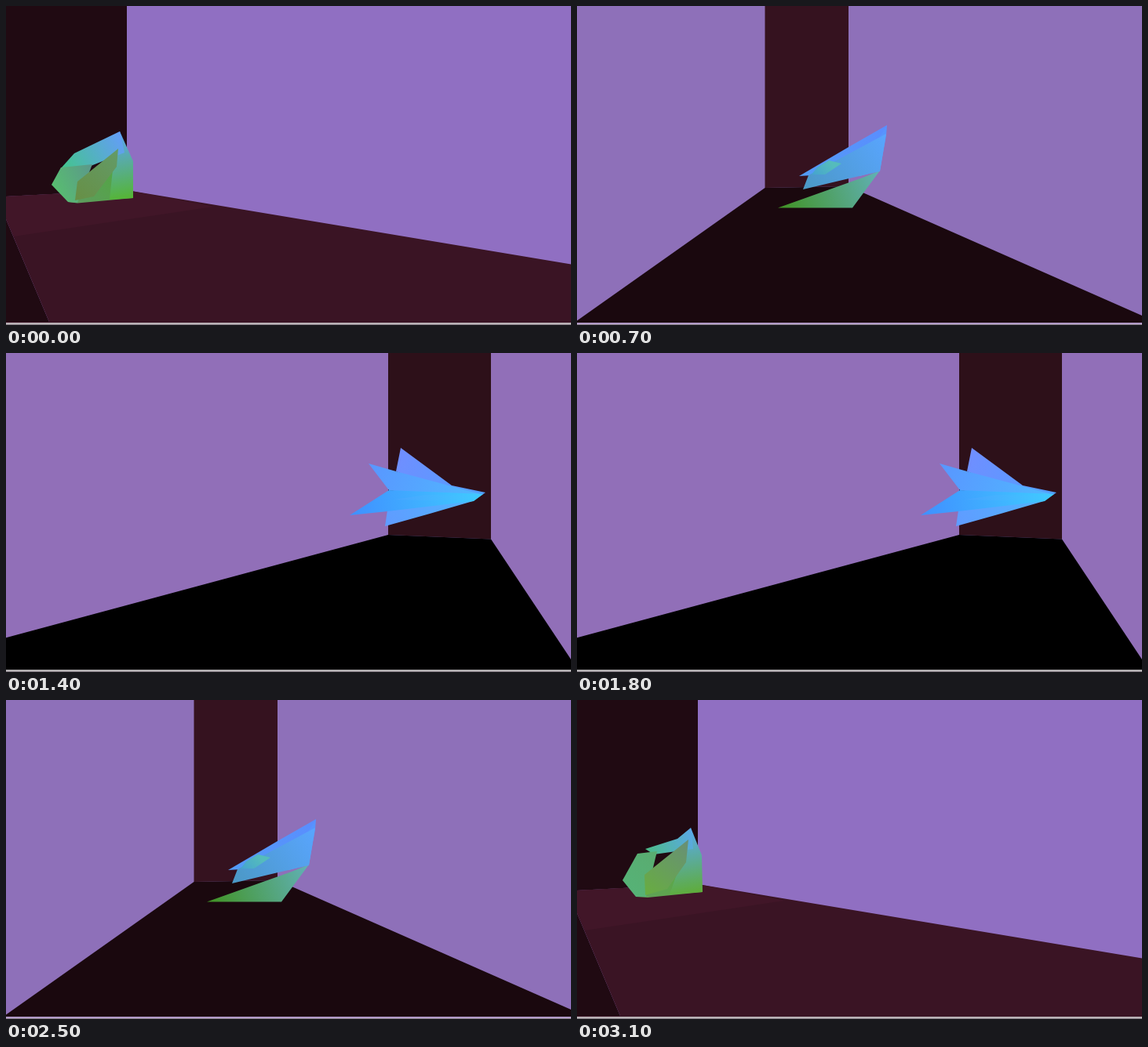
An HTML page with a canvas that plays this animation: 720x407 px, repeating every 3200 ms.

```html
<!DOCTYPE html>
<html lang="en">
<head>
<meta charset="utf-8">
<title>Crystal room</title>
<style>
  html, body { margin: 0; width: 100%; height: 100%; overflow: hidden; background: #000; }
  canvas { display: block; width: 100vw; height: 100vh; }
</style>
</head>
<body>
<canvas id="stage" width="720" height="407"></canvas>
<script>
const ctx = document.getElementById('stage').getContext('2d');
const STEP = 100, LOOP = 3200;

// Room as seen from three points of the camera's orbit.
// Corners are where the far wall meets the floor; ends are the floor edges at y = 403.
const roomLeft = {
  leftCorner: [-12, 243.5], rightCorner: [154, 235], leftEnd: 55, rightEnd: 1160,
  wall: '#906fc2', far: '#200a12', floor: '#3a1424', strip: '#bab3b7', glow: 1
};
const roomCentre = {
  leftCorner: [239.5, 232], rightCorner: [346, 230], leftEnd: -2, rightEnd: 738,
  wall: '#8e70b9', far: '#35121f', floor: '#1a080e', strip: '#b29bc9', glow: 0
};
const roomRight = {
  leftCorner: [487, 232], rightCorner: [618, 237.5], leftEnd: -148, rightEnd: 728,
  wall: '#916fb8', far: '#2d1019', floor: '#000000', strip: '#b5b2b4', glow: 0
};

// Crystal facets in painting order: lower, side, upper, middle, inner.
// Each has two colours, blended from its first corner to its third.
const facet = (from, to, ...corners) => ({ from, to, corners });

const blobWide = [
  facet('#5f9a62', '#50a83c', 79, 250, 91, 222, 150, 195, 162, 245, 91, 251.5),
  facet('#5ba4fa', '#55b532', 145, 160, 162, 198, 162, 245, 132, 247, 138, 190),
  facet('#43c58b', '#649df8', 70, 207, 87, 188, 145, 160, 151, 187, 108, 204),
  facet('#58bd70', '#5b978b', 58, 228, 70, 206, 110, 202, 91, 251, 79, 250),
  facet('#678f45', '#639b68', 88, 248, 91, 224, 143, 182, 141, 205, 112, 243)
];
const blobTall = [
  facet('#60a05a', '#5aab3b', 75, 251, 90, 225, 150, 195, 160, 245, 90, 252),
  facet('#58aaf4', '#5fac38', 145, 163, 159, 198, 160, 245, 118, 248, 140, 185),
  facet('#4cbb87', '#5ba8e8', 87, 190, 128, 177, 145, 163, 148, 190, 98, 197),
  facet('#56b276', '#5aab70', 58, 230, 77, 196, 102, 193, 88, 251, 75, 251),
  facet('#68ad40', '#688f78', 87, 249, 86, 223, 142, 178, 139, 207, 115, 241)
];
const wingsCentre = [
  facet('#419322', '#61b1b7', 256, 257.5, 364, 219, 386, 210, 351, 257.5, 303, 257.5),
  facet('#5791ff', '#5ba5f8', 395, 152, 394, 165, 386, 210, 360, 217, 365, 180),
  facet('#529cf5', '#5a8dff', 283, 217, 346, 180, 395, 152, 372, 190, 316, 215),
  facet('#4b98c4', '#59a5ff', 288, 234, 295, 216, 394, 163, 386, 211, 351, 219),
  facet('#45a3cf', '#55bcbc', 299, 215, 306, 206, 321, 197, 337, 201, 316, 215)
];
const wingsFlat = [
  facet('#4da6cb', '#50b7f4', 453, 220.5, 530, 210, 590, 202, 538, 233, 515, 230),
  facet('#65aaff', '#4fc3ff', 614, 168, 602, 185, 590, 201, 565, 206, 560, 190),
  facet('#57a0ff', '#68adff', 477, 194, 550, 180, 614, 168, 590, 202, 496, 195.5),
  facet('#4998f5', '#52baff', 470, 201, 496, 197, 602, 185, 590, 202, 541, 208),
  facet('#57a9ff', '#5bb4ff', 515, 197, 550, 190, 600, 184, 585, 198, 550, 200)
];
const birdOpen = [
  facet('#609bff', '#50b5ff', 483, 221, 486, 201, 598, 184, 595, 189, 540, 205),
  facet('#708eff', '#519fff', 503, 121, 568, 169, 611, 178, 595, 189, 497, 151),
  facet('#5996ff', '#50b8ff', 462, 141, 497, 151, 605, 180, 580, 188, 488, 175),
  facet('#408fff', '#3fccff', 438, 207, 488, 175, 608, 180, 596, 189, 486, 202),
  facet('#48a4ff', '#40c8ff', 495, 187, 535, 181, 600, 182, 588, 187, 540, 188)
];

const roomKeys = [[0, roomLeft], [250, roomLeft], [700, roomCentre], [1000, roomRight], [1600, roomRight]];
const crystalKeys = [[0, blobWide], [100, blobTall], [250, blobTall], [700, wingsCentre],
                     [1000, wingsFlat], [1400, birdOpen], [1600, birdOpen]];

function mixColour(a, b, k) {
  const channel = (c, i) => parseInt(c.slice(i, i + 2), 16);
  return `rgb(${[1, 3, 5].map(i => Math.round(mix(channel(a, i), channel(b, i), k)))})`;
}

// Blends numbers, colours, and lists or objects of them.
function mix(a, b, k) {
  if (typeof a === 'number') return a + (b - a) * k;
  if (typeof a === 'string') return mixColour(a, b, k);
  if (Array.isArray(a)) return a.map((v, i) => mix(v, b[i], k));
  return Object.fromEntries(Object.keys(a).map(key => [key, mix(a[key], b[key], k)]));
}

function sample(keys, time) {
  const next = Math.max(1, keys.findIndex(key => key[0] >= time));
  const [start, a] = keys[next - 1], [end, b] = keys[next];
  return mix(a, b, (time - start) / (end - start));
}

function polygon(fill, points) {
  ctx.fillStyle = fill;
  ctx.beginPath();
  for (let i = 0; i < points.length; i += 2) ctx.lineTo(points[i], points[i + 1]);
  ctx.closePath();
  ctx.fill();
}

function drawRoom(room) {
  const [lx, ly] = room.leftCorner, [rx, ry] = room.rightCorner;
  ctx.fillStyle = room.wall;
  ctx.fillRect(0, 0, 720, 407);
  polygon(room.far, [lx, 0, rx, 0, rx, ry, lx, ly]);
  // Past the left wall only its dark back is seen.
  if (lx < room.leftEnd) polygon(room.far, [-400, 0, lx, 0, lx, ly, room.leftEnd, 403, -400, 403]);
  polygon(room.floor, [lx, ly, rx, ry, room.rightEnd, 403, room.leftEnd, 403]);
  if (room.glow > 0) {
    ctx.globalAlpha = room.glow;
    polygon('#411628', [lx, ly, rx, ry, rx + 110, ry + 21, lx + 22, ly + 50.5]);
    ctx.globalAlpha = 1;
  }
  ctx.fillStyle = room.floor;
  ctx.fillRect(0, 403, 720, 4);
  ctx.fillStyle = room.strip;
  ctx.fillRect(0, 404, 720, 2);
  ctx.fillStyle = '#8d858d';
  ctx.fillRect(0, 406, 720, 1);
}

function drawFacet({ from, to, corners }) {
  const shade = ctx.createLinearGradient(corners[0], corners[1], corners[4], corners[5]);
  shade.addColorStop(0, from);
  shade.addColorStop(1, to);
  polygon(shade, corners);
}

function draw(now) {
  const time = Math.floor(now % LOOP / STEP) * STEP;
  const swing = Math.min(time, LOOP - time);
  drawRoom(sample(roomKeys, swing));
  sample(crystalKeys, swing).forEach(drawFacet);
}

let start;
function tick(now) {
  start ??= now;
  draw(now - start);
  requestAnimationFrame(tick);
}
draw(0);
requestAnimationFrame(tick);
</script>
</body>
</html>
```
